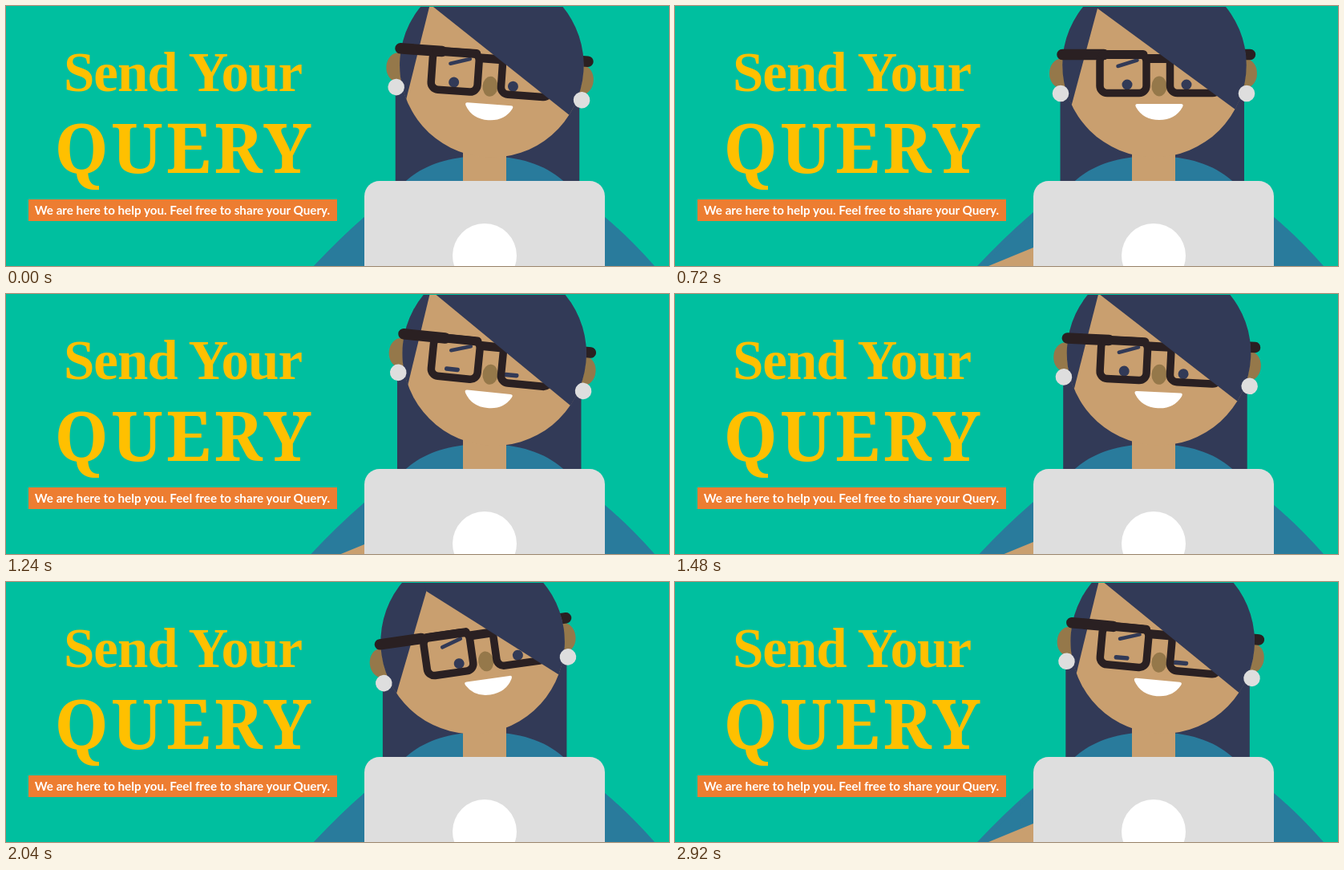
An HTML page for the animation above (2.96 s loop, 827 by 324 pixels).

```html
<!DOCTYPE html>
<html lang="en">
<head>
<meta charset="utf-8">
<title>Send Your Query</title>
<style>
  @property --tilt { syntax: "<number>"; inherits: true; initial-value: 0; }
  @property --arm { syntax: "<number>"; inherits: true; initial-value: 0; }
  @property --shut { syntax: "<number>"; inherits: true; initial-value: 0; }

  html, body { margin: 0; width: 100%; height: 100%; overflow: hidden; background: #00bf9f; }

  svg {
    display: block;
    width: 827px;
    height: 324px;
    /* features follow a left turn less than a right turn */
    --drift: calc(max(var(--tilt), 0) + 0.57 * min(var(--tilt), 0));
    animation: pose 2960ms ease-in-out infinite, blink 2960ms step-end infinite;
  }

  @keyframes pose {
    0%     { --tilt: 4;    --arm: 0; }
    24.32% { --tilt: 0;    --arm: 23; }
    41.89% { --tilt: 5.7;  --arm: 12; }
    58.11% { --tilt: 0;    --arm: 18; }
    68.92% { --tilt: -8.1; --arm: 0; }
    82.43% { --tilt: 5.7;  --arm: 10; }
    98.65%, 100% { --tilt: 5.2; --arm: 23; }
  }

  @keyframes blink {
    0%     { --shut: 0; }
    40.5%  { --shut: 1; }
    44.6%  { --shut: 0; }
    56.7%  { --shut: 1; }
    60.8%  { --shut: 0; }
    97.2%, 100% { --shut: 1; }
  }

  .hair { fill: #323a57; }
  .skin { fill: #c99f6f; }
  .shade { fill: #95784a; }
  .shirt { fill: #297b9c; }
  .metal { fill: #dedede; }
  .white { fill: #fff; }
  .frame { fill: none; stroke: #2a2022; stroke-linecap: round; }

  .head { transform: rotate(calc(var(--tilt) * 1deg)); transform-origin: 597px 186px; }
  .locks { transform: translateX(calc(var(--tilt) * 1.31px)); }
  .part { transform: skewX(calc(var(--tilt) * 1.3deg)); transform-origin: 0 125px; }
  .mid { transform: translateX(calc(var(--drift) * -1.5px)); }
  .mouth { transform: translateX(calc(var(--drift) * -1.4px)); }
  .eyes { transform: translateX(calc(var(--drift) * -2.9px)); }
  .open { opacity: calc(1 - var(--shut)); }
  .lids { opacity: var(--shut); }
  .arm { transform: translateY(calc(23px - var(--arm) * 1px)); }
  .sleeve { transform: translateX(calc(var(--arm) * -0.3px)); }

  text { text-anchor: middle; font-weight: 700; }
  .title { fill: #ffc000; }
  .send { font: 700 69px "Liberation Serif", serif; letter-spacing: -1px; }
  .query { font: 700 85.5px "Noto Serif", serif; letter-spacing: 4px; }
  .note { font: 700 15.2px Lato, sans-serif; fill: #fff; }
</style>
</head>
<body>
<svg viewBox="0 0 827 324">
  <defs>
    <clipPath id="stage"><rect y="1" width="827" height="323"/></clipPath>
    <clipPath id="skull"><circle cx="598" cy="73.5" r="114.8"/></clipPath>
  </defs>

  <rect width="827" height="324" fill="#00bf9f"/>
  <text class="title send" x="220.5" y="105.5">Send Your</text>
  <text class="title query" x="222.5" y="207.5">QUERY</text>
  <rect x="28" y="241" width="385" height="27" fill="#ed7d31"/>
  <text class="note" x="220" y="260">We are here to help you. Feel free to share your Query.</text>

  <g clip-path="url(#stage)">
    <rect class="hair locks" x="480.5" y="82" width="229.5" height="150"/>

    <path class="shirt sleeve" d="M384 324Q418 288 447 263L470 243V324Z"/>
    <path class="shirt" d="M384 324Q418 288 447 263L500 217C522 198 553 187 597 187C641 187 672 198 694 217L747 263Q777 288 809 324Z"/>
    <path class="skin arm" d="M391 324L447 301L470 292V360H391Z"/>
    <rect class="skin" x="570" y="165" width="54" height="60"/>

    <g class="head">
      <ellipse class="shade" cx="481" cy="84" rx="14" ry="18"/>
      <ellipse class="shade" cx="712" cy="84" rx="14" ry="18"/>
      <path class="frame" stroke-width="13.5" d="M690 60.5H717.5"/>
      <circle class="skin" cx="598" cy="74" r="114.4"/>
      <g clip-path="url(#skull)">
        <path class="hair part" d="M527 3L494 126H460V-60H527Z"/>
      </g>

      <g class="mid">
        <ellipse class="shade" cx="604" cy="100" rx="9.5" ry="12.5"/>
        <path d="M552.5 75L576.5 67.5" stroke="#323a57" stroke-width="4.5" stroke-linecap="round"/>
      </g>
      <g class="eyes">
        <g class="hair open">
          <circle cx="564" cy="98" r="6.5"/>
          <circle cx="638" cy="98" r="6.5"/>
        </g>
        <g class="hair lids">
          <rect x="554.5" y="95.5" width="19" height="5.5" rx="2.7"/>
          <rect x="628.5" y="95.5" width="19" height="5.5" rx="2.7"/>
        </g>
      </g>
      <path class="white mouth" d="M577 122H631Q635 122 633 126Q624 142 604 142Q584 142 575 126Q573 122 577 122Z"/>

      <path class="frame" stroke-width="13.5" d="M483 60.5H535"/>
      <g class="mid frame" stroke-width="9.5">
        <rect x="530" y="60" width="58" height="48.5" rx="9"/>
        <rect x="617.5" y="60" width="62" height="48.5" rx="9"/>
        <path stroke-width="11" d="M534 60.5H584M590 65.5H616"/>
      </g>

      <g clip-path="url(#skull)">
        <path class="hair part" d="M527 3L699 129H760V-60H510Z"/>
      </g>
      <circle class="metal" cx="481" cy="109" r="10.3"/>
      <circle class="metal" cx="713" cy="109" r="10.3"/>
    </g>

    <rect class="metal" x="447" y="218" width="300" height="140" rx="19"/>
    <circle class="white" cx="597" cy="311" r="40"/>
  </g>
</svg>
</body>
</html>
```
